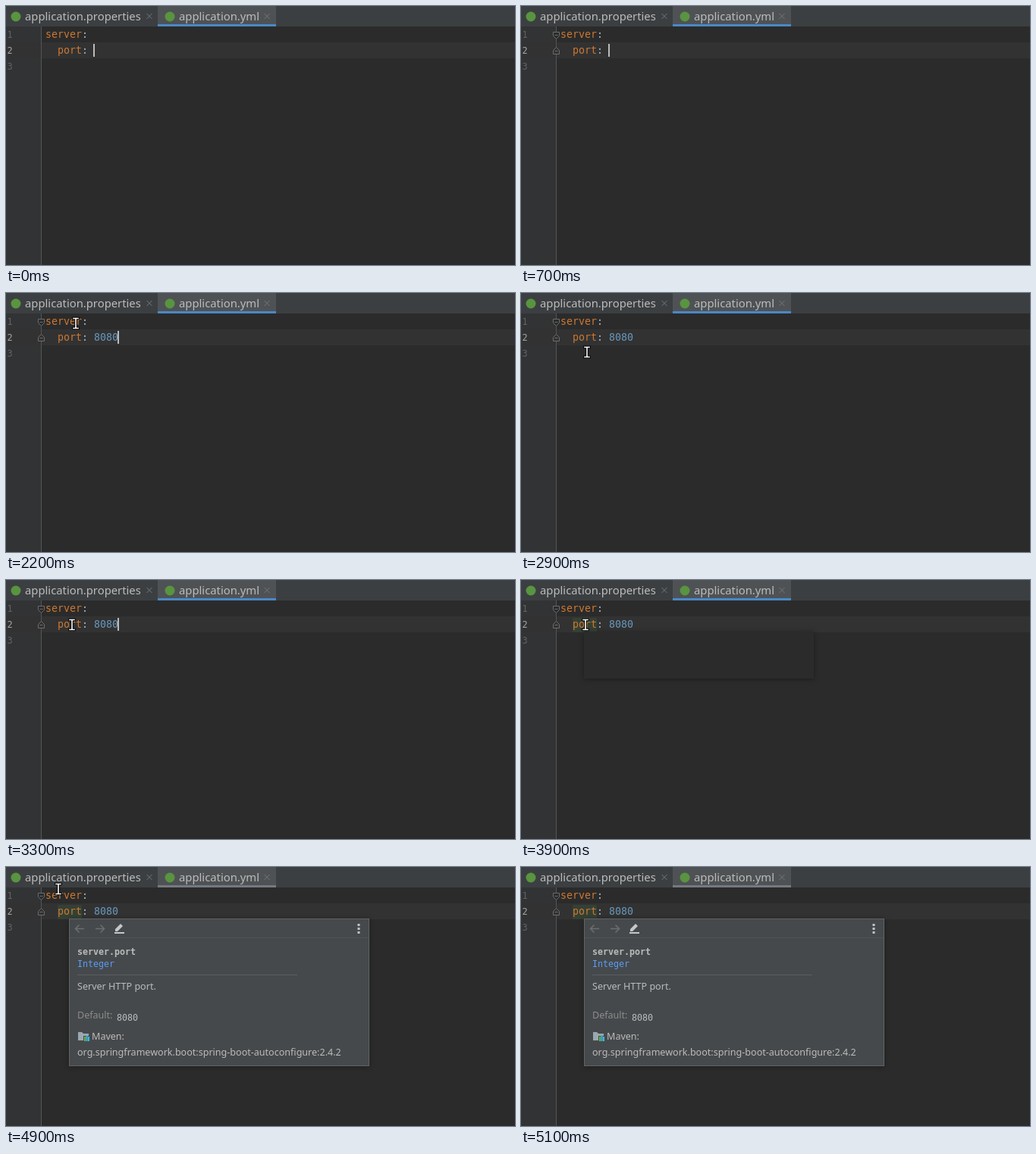
Recreate the animation shown at these times as an HTML page with a canvas. Size 671 by 342 pixels, loop 5.8 s.

```html
<!DOCTYPE html>
<html lang="en">
<head>
<meta charset="utf-8">
<title>Editor</title>
<style>
  html, body { margin: 0; width: 100%; height: 100%; overflow: hidden; background: #2b2b2b; }
  canvas { display: block; }
</style>
</head>
<body>
<canvas id="stage" width="671" height="342"></canvas>
<script>
const ctx = document.getElementById('stage').getContext('2d');
const LOOP = 5800;
const UI = '"Noto Sans", sans-serif';
const MONO = '"DejaVu Sans Mono", monospace';
const CODE = '13.29px ' + MONO;
const DOC = '12.55px ' + UI;

// Pointer stops: [start time, shape, x, y]; the text pointer is placed by its centre.
const pointerStops = [
  [0], [2200, 'text', 92, 40], [2300, 'arrow', 102, 13], [2500],
  [2700, 'text', 91, 64], [2800, 'text', 89, 73], [2900, 'text', 87, 78],
  [3000, 'text', 85, 74], [3100, 'text', 87, 67], [3200, 'text', 94, 61],
  [3300, 'text', 87, 59], [3500, 'text', 85, 59], [4100, 'text', 95, 64],
  [4400, 'text', 83, 67], [4900, 'text', 69, 29], [5000, 'arrow', 61, 2], [5100],
];

function rect(x, y, w, h, color) {
  ctx.fillStyle = color;
  ctx.fillRect(x, y, w, h);
}

function text(str, x, y, font, color) {
  ctx.font = font;
  ctx.fillStyle = color;
  ctx.fillText(str, x, y);
}

function path(d, stroke, width = 1, fill) {
  const shape = new Path2D(d);
  if (fill) { ctx.fillStyle = fill; ctx.fill(shape); }
  if (stroke) { ctx.strokeStyle = stroke; ctx.lineWidth = width; ctx.stroke(shape); }
}

function at(x, y, draw) {
  ctx.save();
  ctx.translate(x, y);
  draw();
  ctx.restore();
}

function tab(x, name) {
  path(`M${x + 19.5} 14a6.5 6.5 0 1 1-13 0a6.5 6.5 0 1 1 13 0`, null, 0, '#599440');
  text(name, x + 25, 19, '14.8px ' + UI, '#bbbbbb');
}

function closeMark(x) {
  path(`M${x - 3.5} 10l7 7m0-7l-7 7`, '#73777a');
}

function drawTabs(t) {
  rect(0, 0, 671, 27, '#3c3f41');
  if (t >= 5000 && t < 5100) rect(0, 0, 200, 27, '#2e3133');
  rect(200, 0, 156, 27, '#4e5254');
  rect(200, 24, 156, 3, t < 4000 ? '#4a88c7' : '#747a80');
  tab(0, 'application.properties');
  tab(203, 'application.yml');
  closeMark(189);
  closeMark(344);
}

function drawEditor(t) {
  rect(0, 27, 671, 315, '#2b2b2b');
  rect(0, 27, 46, 315, '#313335');
  rect(0, 48, 671, 21, '#323232');
  rect(46, 27, 1, 315, '#555555');
  for (let n = 1; n <= 3; n++) {
    text(n, 1.5, 21 + 21 * n, '12px ' + MONO, n === 2 ? '#a4a3a3' : '#606366');
  }
  if (t >= 700) {
    path('M42.5 34.5h8v5l-4 4l-4-4zM44.5 38.5h4', '#6c6c6c', 1, '#2b2b2b');
    path('M42.5 63.5h8v-5l-4-4l-4 4zM44.5 59.5h4', '#6c6c6c', 1, '#323232');
  }
  if (t >= 3800) rect(68, 50, 32, 19, '#344134');

  text('server', 52, 42, CODE, '#cc7832');
  text(':', 100, 42, CODE, '#a9b7c6');
  text('port', 68, 63, CODE, '#cc7832');
  text(':', 100, 63, CODE, '#a9b7c6');
  const typed = Math.max(0, Math.min(4, Math.floor((t - 800) / 100)));
  text('8080'.slice(0, typed), 116, 63, CODE, t < 1900 ? '#a9b7c6' : '#6897bb');
  if (t < 2700 || (t >= 3100 && t < 3500)) rect(115 + typed * 8, 50, 2, 17, '#bbbbbb');
}

function shadowBox(x, y, w, h, color, alpha) {
  ctx.save();
  ctx.shadowColor = `rgba(0,0,0,${alpha})`;
  ctx.shadowBlur = 7;
  ctx.shadowOffsetY = 1;
  rect(x, y, w, h, color);
  ctx.restore();
}

function drawPopup() {
  shadowBox(83, 68, 396, 195, '#616365', 0.3);
  rect(84, 69, 394, 193, '#46494b');
  rect(84, 93, 394, 1, '#515456');

  path('M103 81.5H91.5m5-5l-5 5l5 5M118 81.5h11.5m-5-5l5 5l-5 5', '#6b6e70', 1.5);
  path('M144 82l7-7l3 3l-7 7h-3z', null, 0, '#c5c7c8');
  rect(143, 86, 13, 2, '#c5c7c8');
  for (const y of [75, 80, 85]) rect(463.5, y, 3, 3, '#c0c2c3');

  text('server.port', 94, 116, 'bold 11.63px ' + MONO, '#bbbbbb');
  text('Integer', 94, 132, '11.63px ' + MONO, '#589df6');
  rect(94, 142, 290, 1, '#5c5f61');
  text('Server HTTP port.', 94, 162, DOC, '#bbbbbb');
  text('Default:', 94, 200, DOC, '#8c8c8c');
  text('8080', 146, 203, '11.63px ' + MONO, '#bbbbbb');

  path('M95 218h5l2 2h7v3h-7v6h-7z', null, 0, '#9aa7b0');
  rect(103, 224, 2, 6, '#62b543');
  rect(105.5, 222, 2, 8, '#40b6e0');
  rect(108, 224, 2, 6, '#40b6e0');
  text('Maven:', 113, 228, DOC, '#bbbbbb');
  text('org.springframework.boot:spring-boot-autoconfigure:2.4.2', 94, 249, DOC, '#bbbbbb');
}

function drawPointer(t) {
  const [, shape, x, y] = pointerStops.findLast(stop => t >= stop[0]);
  if (!shape) return;
  at(x, y, () => {
    if (shape === 'text') {
      const beam = 'M-3-6.5h6M-3 6.5h6M0-6.5v13';
      ctx.lineCap = 'square';
      path(beam, '#000000', 3.6);
      path(beam, '#ffffff', 1.6);
    } else {
      path('M1 1v15l3.5-3.5l2.5 6l3-1.2l-2.5-5.8h5z', '#ffffff', 1.2, '#000000');
    }
  });
}

function render(t) {
  drawEditor(t);
  drawTabs(t);
  if (t >= 4000) drawPopup();
  else if (t >= 3900) shadowBox(83, 68, 303, 62, '#2b2b2b', 0.35);
  drawPointer(t);
}

const start = performance.now();
function tick() {
  render((performance.now() - start) % LOOP);
  requestAnimationFrame(tick);
}
tick();
</script>
</body>
</html>
```
